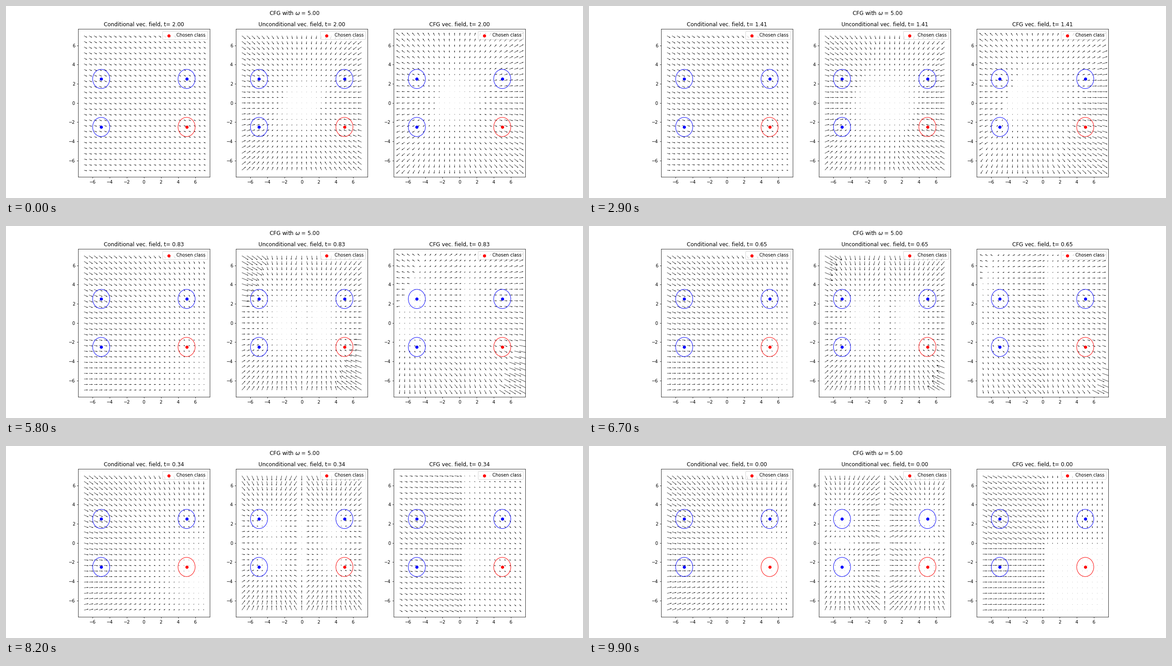
Recreate the animation shown at these times as a matplotlib script. Size 1280 px wide and 427 px high, loop 10000 ms.

```python
import numpy as np
import matplotlib.pyplot as plt
from matplotlib.animation import FuncAnimation

W, H, DPI = 1280, 427, 71
FRAMES, INTERVAL = 100, 100
OMEGA = 5.0
T_MAX = 2.0
EXP_LIMIT = 88.7  # single precision exp range

CENTERS = [(-5, -2.5), (-5, 2.5), (5, 2.5), (5, -2.5)]
CHOSEN = CENTERS[-1]
PANELS = ["Conditional vec. field", "Unconditional vec. field", "CFG vec. field"]

axis = np.linspace(-7, 7, 25)
# Rounding keeps the symmetry axes exactly at zero.
X, Y = np.meshgrid(np.round(axis, 9), np.round(axis, 9))


def conditional(t):
    decay = np.exp(-t)
    var = 1 - decay**2
    return [(decay * c - decay**2 * p) / var for p, c in zip((X, Y), CHOSEN)]


def unconditional(t):
    decay = np.exp(-t)
    var = 1 - decay**2
    k = decay / var
    mx = 5 * np.tanh(5 * k * X)
    my = 2.5 * np.tanh(2.5 * k * Y)
    along = CHOSEN[0] * X + CHOSEN[1] * Y
    mx = np.where(np.abs(along) * np.exp(t) > EXP_LIMIT, -mx, mx)
    return [(decay * mx - X) / var, (decay * my - Y) / var]


def fields(t):
    t = max(t, 1e-3)
    cond, free = conditional(t), unconditional(t)
    guided = [c + OMEGA * (c - f) for c, f in zip(cond, free)]
    return cond, free, guided


def make_panel(ax):
    arrows = ax.quiver(X, Y, np.ones_like(X), np.ones_like(Y))
    for center in CENTERS:
        chosen = center == CHOSEN
        color = "red" if chosen else "blue"
        ax.scatter(*center, color=color, label="Chosen class" if chosen else None)
        ax.add_patch(plt.Circle(center, 1, color=color, fill=False))
    ax.set_xlim(-7.7, 7.7)
    ax.set_ylim(-7.7, 7.7)
    ax.set_xticks(range(-6, 7, 2))
    ax.set_yticks(range(-6, 7, 2))
    ax.legend(loc="upper right")
    return arrows


# The tiny surplus guards against truncation to one pixel less.
fig, axes = plt.subplots(1, 3, dpi=DPI,
                         figsize=((W + 1e-4) / DPI, (H + 1e-4) / DPI))
fig.suptitle(rf"CFG with $\omega$ = {OMEGA:.2f}")
quivers = [make_panel(ax) for ax in axes]


def update(i):
    t = T_MAX * (1 - i / (FRAMES - 1))
    for ax, arrows, name, (u, v) in zip(axes, quivers, PANELS, fields(t)):
        arrows.set_UVC(u, v)
        arrows.scale = None  # rescale to the current mean length
        ax.set_title(f"{name}, t= {t:.2f}")
    return quivers


anim = FuncAnimation(fig, update, frames=FRAMES, interval=INTERVAL,
                     init_func=lambda: update(0), repeat=True, repeat_delay=0)
plt.show()
```
